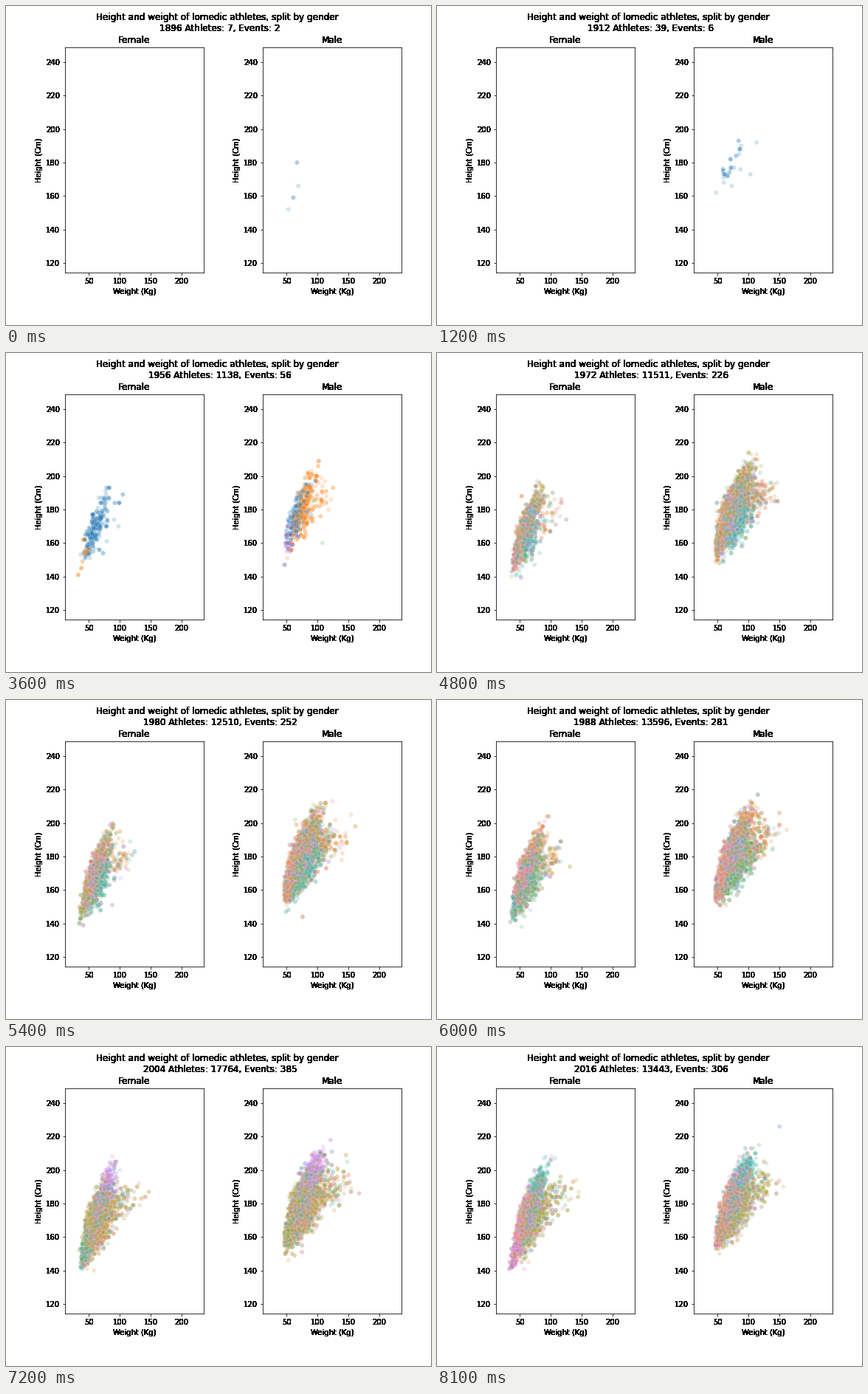
A matplotlib script that plays this animation: 576 by 432 pixels, repeating every 8.4 s.

```python
import numpy as np
import matplotlib.pyplot as plt
from matplotlib.animation import FuncAnimation
from matplotlib.colors import to_rgb

W, H, DPI = 576, 432, 72
plt.rcParams["font.family"] = "DejaVu Sans"

YEARS = [y for y in range(1896, 2017, 4) if y not in (1916, 1940, 1944)]

# Key points of the two counters; the years between follow geometrically.
COUNT_YEARS = (1896, 1932, 1956, 1960, 1972, 1988, 2004, 2016)
ATHLETES = (7, 327, 1138, 8400, 11511, 13596, 17764, 13443)
EVENTS = (2, 27, 56, 170, 226, 281, 385, 306)

# Share, height offset and spread, body mass index offset and relative spread.
BUILDS = {
    "all-round": (.33, 2, 8, .3, .075),
    "runner": (.32, -1, 7.5, -1.7, .085),
    "wrestler": (.15, -4, 8, 3, .12),
    "gymnast": (.10, -15, 5, -2.3, .07),
    "player": (.07, 17, 7, .3, .07),
    "thrower": (.03, 10, 6, 8.5, .13),
    "stray": (.003, 0, 14, 3, .25),
}

# Place on the colour wheel at key years; other builds have mixed colours.
HUE_YEARS = (1972, 1988, 2004, 2016)
HUES = {
    "runner": (1, .4, 2, .4),
    "wrestler": (5, 3.5, 1.4, 2),
    "gymnast": (0, 4.8, 4, 9),
    "player": (1.7, 1, 8, 4.8),
    "thrower": (.9, 1, 1.6, 2),
}

TAB = np.array([to_rgb(f"C{i}") for i in range(5)])
WHEEL = np.array([to_rgb(c) for c in (
    "#f77189", "#dc8932", "#ae9d31", "#77ab31", "#33b07a",
    "#36ada4", "#38a9c5", "#6e9bf4", "#cc7af4", "#f565cc")])


def counter(year, values):
    return round(np.exp(np.interp(year, COUNT_YEARS, np.log(values))))


def female_share(year):
    if year < 1932:
        return 0
    return .006 * (year - (1904 if year < 1960 else 1938))


def early_colors(year, male, build, n):
    index = 0
    if year >= 1948:
        if male:
            index = {"runner": 0, "gymnast": 4, "stray": 2}.get(build, 1)
        else:
            index = int(build == "gymnast")
    return np.tile(TAB[index], (n, 1))


def late_colors(rng, year, male, build, n):
    hue = rng.integers(0, 27, n) / 2.7
    if male and build == "gymnast":
        build = "runner"
    if build in HUES:
        own = np.interp(year, HUE_YEARS, HUES[build])
        hue = np.where(rng.random(n) < .4, hue, own)
    return np.column_stack([np.interp(hue, np.arange(10), channel, period=10)
                            for channel in WHEEL.T])


def crowd(year, male):
    """Weight and height of every entry in one panel, with its colour."""
    rng = np.random.default_rng(year * 2 + male)
    share = female_share(year)
    total = counter(year, ATHLETES) * (1 - share if male else share)
    base_height, base_bmi = (178, 23) if male else (168.5, 21.5)
    drift = (year - 1990) * (.03 if male else .11) if year >= 1960 else 0

    points, colors = [np.empty((0, 2))], [np.empty((0, 3))]
    for build, (part, dh, spread, dbmi, bmi_spread) in BUILDS.items():
        n = round(total * part)
        if not n:
            continue
        small = build == "gymnast"
        pool = int(n * (.35 if small else .75)) + 1
        height = rng.normal(base_height + dh + (0 if small else drift),
                            spread, pool)
        bmi = (base_bmi + dbmi) * np.exp(rng.normal(0, bmi_spread, pool))
        athletes = np.column_stack([bmi * (height / 100) ** 2, height])
        # Some athletes enter more than one event.
        points.append(athletes.round()[rng.integers(0, pool, n)])
        colors.append(early_colors(year, male, build, n) if year < 1960
                      else late_colors(rng, year, male, build, n))

    points, colors = np.concatenate(points), np.concatenate(colors)
    order = rng.permutation(len(points))
    order = order[points[order, 0] > (46 if male else 30)]
    return points[order], np.column_stack([colors[order],
                                           np.full(len(order), .2)])


def strike(text, times=20):
    """Overprint a text so that its soft edges turn dark."""
    draw = text.draw

    def overprint(renderer):
        for _ in range(times):
            draw(renderer)

    text.draw = overprint
    return text


def heading(x, y, words):
    return strike(fig.text(x / W, 1 - y / H, words, size=12,
                           ha="center", va="baseline"))


def panel(left, title):
    ax = fig.add_axes([left / W, 71 / H, 188 / W, 305 / H])
    ax.set(xlim=(11.7, 235.5), ylim=(114.27, 248.82), title=title,
           xlabel="Weight (Kg)", ylabel="Height (Cm)",
           xticks=range(50, 201, 50), yticks=range(120, 241, 20))
    for text in (ax.title, ax.xaxis.label, ax.yaxis.label,
                 *ax.get_xticklabels(), *ax.get_yticklabels()):
        strike(text)
    return ax.scatter([], [], s=36, linewidths=.48,
                      edgecolors=[(1, 1, 1, .2)])


fig = plt.figure(figsize=(W / DPI, H / DPI), dpi=DPI, facecolor="white")
heading(286.5, 19, "Height and weight of lomedic athletes, split by gender")
counts = heading(290, 34, "")
dots = [panel(80, "Female"), panel(348, "Male")]


def update(i):
    year = YEARS[i]
    counts.set_text(f"{year} Athletes: {counter(year, ATHLETES)}, "
                    f"Events: {counter(year, EVENTS)}")
    for male, dot in enumerate(dots):
        points, colors = crowd(year, male)
        dot.set_offsets(points)
        dot.set_facecolors(colors)
    return [counts, *dots]


anim = FuncAnimation(fig, update, frames=len(YEARS), interval=300,
                     repeat=True, repeat_delay=0)
plt.show()
```
